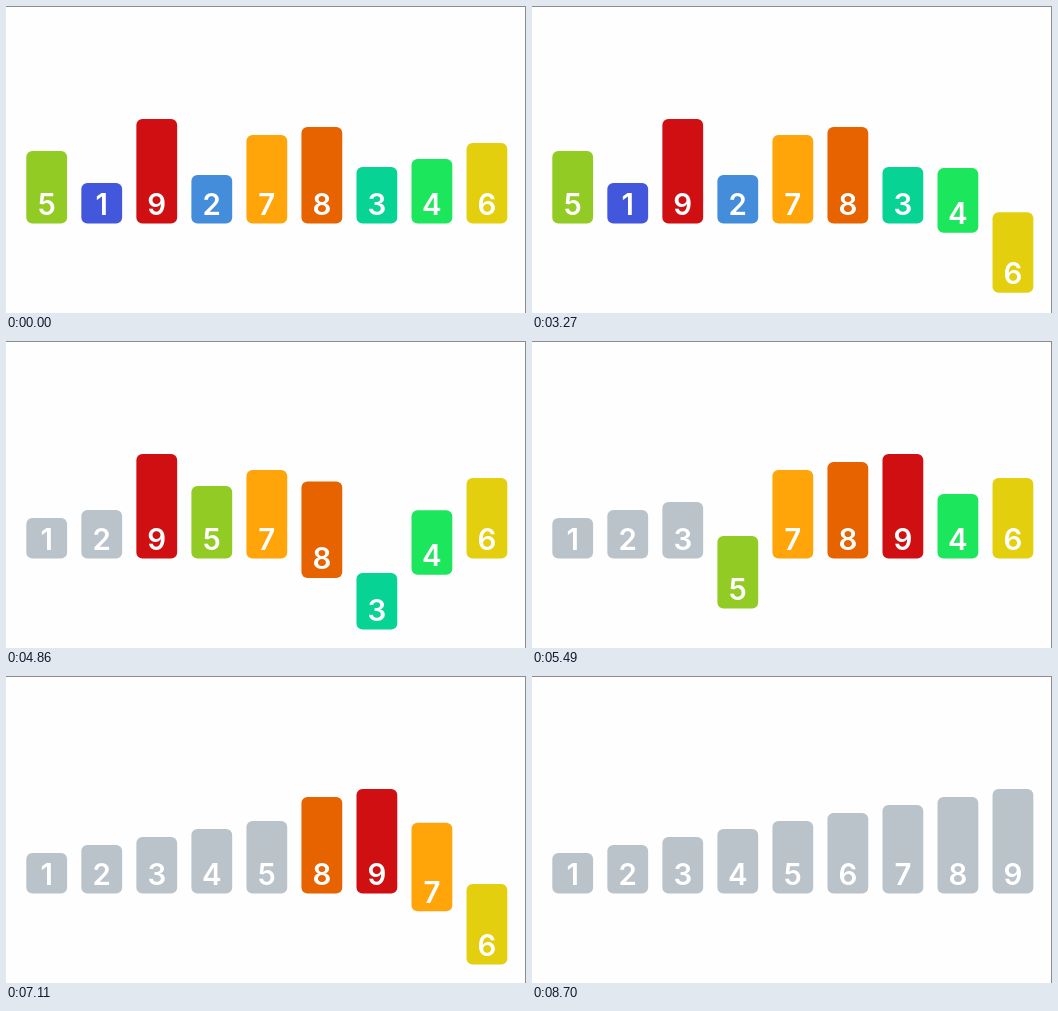
These frames come from a looping animation (520x307 px, 9390 ms). An HTML page with a canvas:

```html
<!DOCTYPE html>
<html lang="en">
<head>
<meta charset="utf-8">
<title>Selection sort</title>
<style>
  html, body { margin: 0; width: 100%; height: 100%; overflow: hidden; background: #fefefe; }
  canvas { display: block; }
</style>
</head>
<body>
<canvas id="stage" width="520" height="307"></canvas>
<script>
const ctx = document.getElementById('stage').getContext('2d');
const LOOP = 9390;
const START = [5, 1, 9, 2, 7, 8, 3, 4, 6];
const COLORS = ['', '#4257db', '#448ddb', '#07d494', '#1be65c', '#91cb24', '#e4cf0f', '#ffa509', '#e66300', '#cf0f12'];
const SORTED = '#b9c3c9';
const FLOOR = 217.6, LEFT = 20.3, PITCH = 55.03, BAR_WIDTH = 40.8;
const DIP = 71, DIP_REACH = 1.5, SCAN_STEP = 40, SWAP_TIME = 200;

// Each pass: when the scan reaches the last slot, and the middle of the swap.
const PASSES = [
  [3264, 3530], [4210, 4470], [4941, 5175], [5712, 5955],
  [6378, 6575], [7110, 7350], [7688, 7980], [8280, 8580]
];

// Picture times: 120 ms apart inside a run, 150 ms between runs.
function buildTicks() {
  const ticks = [0];
  const addRuns = (time, runs) => {
    for (const count of runs) {
      for (let i = 0; i < count; i++) ticks.push(time + 120 * i);
      time += 120 * (count - 1) + 150;
    }
  };
  addRuns(1810, [4, 2, 2]);
  addRuns(3270, [1, 5, 2, 2, 1, 4, 5, 1, 2, 2, 1, 3, 6, 2, 1, 1, 1, 2]);
  return ticks;
}
const TICKS = buildTicks();

const clamp = v => Math.max(0, Math.min(1, v));
const smooth = v => v * v * (3 - 2 * v);

function scanPosition(time, pass) {
  if (pass === 0 && time < 3000) return (time - 2130) / 120;
  return 8 + (time - PASSES[pass][0]) / SCAN_STEP;
}

function dipAt(distance) {
  if (Math.abs(distance) >= DIP_REACH) return 0;
  return DIP * Math.cos(Math.PI * distance / (2 * DIP_REACH)) ** 2;
}

function layout(time) {
  const order = [...START];
  const bars = [];
  let sorted = 0;
  const place = (value, slot, dy) => { bars[value] = { slot, dy }; };

  for (let pass = 0; pass < PASSES.length; pass++) {
    const target = order.indexOf(pass + 1);
    const progress = clamp((time - PASSES[pass][1]) / SWAP_TIME + 0.5);
    if (progress === 1) {
      [order[pass], order[target]] = [order[target], order[pass]];
      sorted = pass + 1;
      continue;
    }
    const position = scanPosition(time, pass);
    order.forEach((value, slot) => place(value, slot, slot < pass ? 0 : dipAt(slot - position)));
    if (progress > 0) {
      const span = target - pass, shift = span * smooth(progress), arc = Math.sin(Math.PI * progress);
      place(order[pass], pass + shift, -13 * arc);
      place(order[target], target - shift, (22 + 9 * span) * arc);
    }
    return { bars, sorted };
  }
  order.forEach((value, slot) => place(value, slot, 0));
  return { bars, sorted: 9 };
}

function drawBar(value, { slot, dy }, color) {
  const height = 32.6 + 8 * value, x = LEFT + PITCH * slot, bottom = FLOOR + dy;
  ctx.fillStyle = color;
  ctx.beginPath();
  ctx.roundRect(x, bottom - height, BAR_WIDTH, height, 6);
  ctx.fill();
  ctx.fillStyle = '#fff';
  ctx.fillText(value, x + BAR_WIDTH / 2, bottom - 8.8);
}

function draw(time) {
  const { bars, sorted } = layout(time);
  ctx.fillStyle = '#fefefe';
  ctx.fillRect(0, 0, 520, 307);
  ctx.fillStyle = '#8c8c8c';
  ctx.fillRect(0, 0, 520, 1);
  ctx.fillRect(519, 0, 1, 307);
  ctx.font = '600 29.5px Inter, "Open Sans", sans-serif';
  ctx.textAlign = 'center';
  for (let value = 9; value > 0; value--) {
    drawBar(value, bars[value], value <= sorted ? SORTED : COLORS[value]);
  }
}

function tick() {
  const now = performance.now() % LOOP;
  draw(TICKS.findLast(t => t <= now));
  requestAnimationFrame(tick);
}
tick();
</script>
</body>
</html>
```
